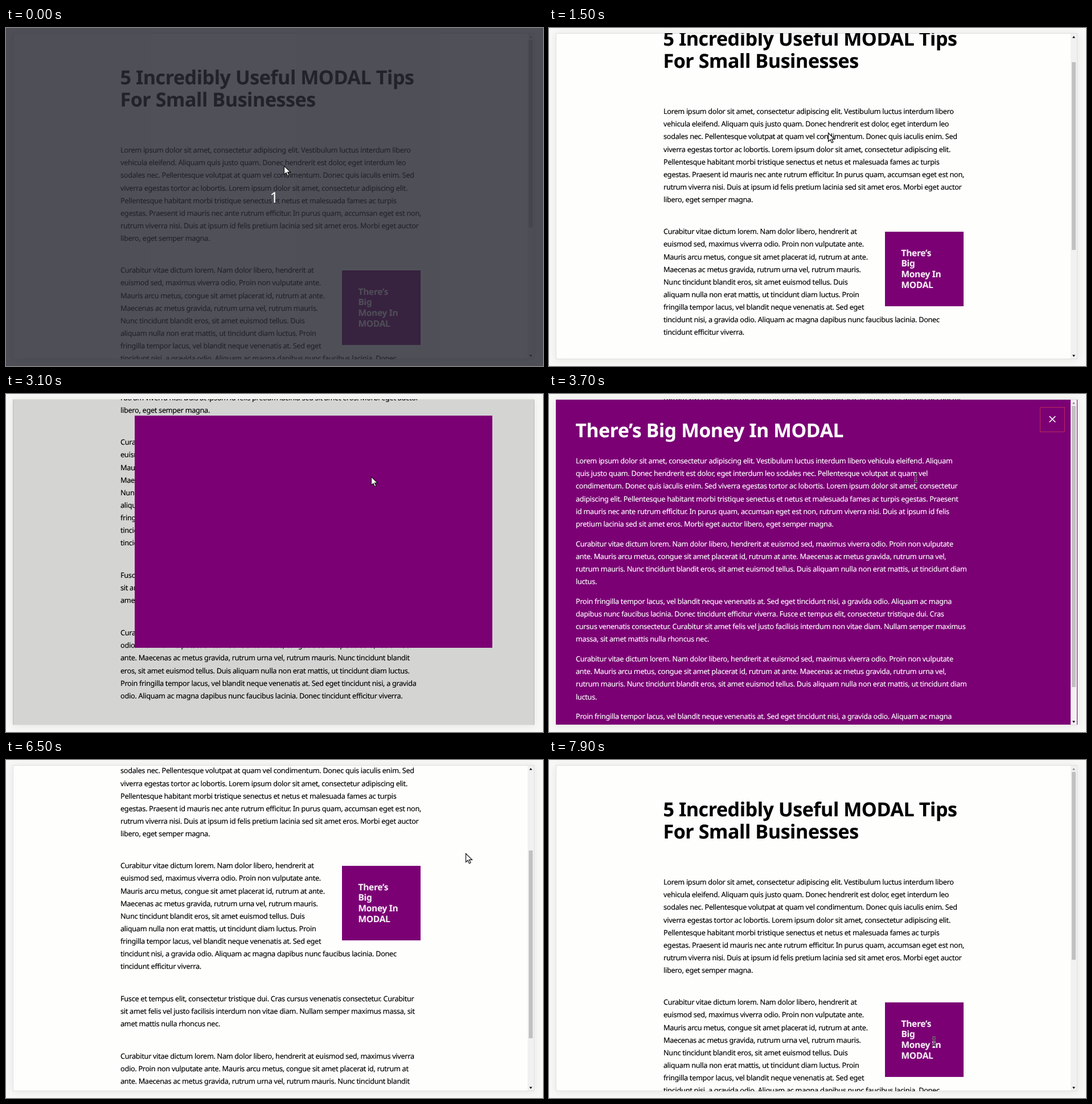
Write an HTML page that moves like this. It is 943 px wide and 594 px high and loops after 8000 ms.

```html
<!DOCTYPE html>
<html lang="en">
<head>
<meta charset="utf-8">
<style>
html, body { margin: 0; width: 100%; height: 100%; overflow: hidden; }
body { position: relative; background: #f8f8f6; font-family: "Noto Sans", "Open Sans", sans-serif; text-rendering: geometricPrecision; }
div, svg { position: absolute; }
#frame, #shade { left: 12px; top: 9px; width: 916px; height: 573px; }
#frame { background: #fefefd; box-shadow: inset 0 0 0 1px #e0e0de; overflow: hidden; }
#shade { box-shadow: 0 1px 14px rgba(0,0,0,.08); }
/* children of these layers use stage coordinates */
.stage { left: -12px; top: -9px; width: 943px; height: 594px; }
.text { white-space: pre; font-size: 12.7px; line-height: 22.13px; letter-spacing: -.29px; -webkit-text-stroke: .15px; }
.title { font-weight: 700; font-size: 34px; line-height: 39px; letter-spacing: -.44px; }
.modalTitle { font-size: 33.5px; letter-spacing: -.32px; }
.cardTitle { font-weight: 700; font-size: 15.5px; line-height: 18.7px; letter-spacing: -.3px; color: #f6ebf5; }
#card, #modal { background: #7b0074; }
#card { left: 590px; top: 426px; width: 138px; height: 131px; }
#backdrop { inset: 1px 0; background: #000; }
#content { color: #fff; }
#close { left: 862px; top: 23px; width: 42px; height: 42px; border: 1px solid #b92a58; }
#bar { left: 916px; top: 10px; width: 11px; height: 571px; background: #f1f1f1; }
#thumb { left: 2px; width: 7px; background: #c1c1c1; }
#dim { inset: 0; background: rgba(41,42,52,.82); }
#count { left: 0; width: 942px; top: 277px; line-height: 40px; font-size: 26px; text-align: center; color: #fff; }
svg { overflow: visible; }
#pointer { left: 0; top: 0; }
</style>
</head>
<body>
<div id="shade"></div>
<div id="frame">
  <div class="stage" id="article"><div id="card"></div></div>
  <div id="backdrop"></div>
  <div class="stage" id="overlay">
    <div id="modal"></div>
    <div id="content">
      <div id="close"><svg width="42" height="42"><path d="M15.750 15l10.500 10.500m0-10.500l-10.500 10.500" stroke="#fff" stroke-width="1.700"/></svg></div>
    </div>
  </div>
  <div class="stage"><div id="bar">
    <div id="thumb"></div>
    <svg width="11" height="571"><path id="up" d="M3 7.500l2.500-3.500 2.500 3.500z"/><path d="M3 564.500l2.500 3.500 2.500-3.500z"/></svg>
  </div></div>
</div>
<div id="dim"><div id="count">1</div></div>
<svg id="pointer" width="1" height="1">
  <path id="arrow" d="M.500 .500V15.500L4 12.300L6.500 17.700L9 16.500L6.500 11.300H11.500Z" fill="#fff" stroke="#111" stroke-width="1.200"/>
  <g id="beam" fill="none">
    <path d="M-3-7H-1L0-6L1-7H3M0-6V6M-3 7H-1L0 6L1 7H3" stroke="#fff" stroke-opacity=".8" stroke-width="3"/>
    <path d="M-3-7H-1L0-6L1-7H3M0-6V6M-3 7H-1L0 6L1 7H3" stroke="#111" stroke-width="1.600"/>
  </g>
</svg>
<script>
const $ = id => document.getElementById(id);

// y is the middle of the first line
function write(parent, x, y, lineHeight, text, style = '') {
  const el = document.createElement('div');
  el.className = 'text ' + style;
  el.style.left = x + 'px';
  el.style.top = y - lineHeight / 2 + 'px';
  el.textContent = text;
  $(parent).append(el);
}
const body = (parent, x, y, text) => write(parent, x, y, 22.13, text);

write('article', 200.5, 86.8, 39, '5 Incredibly Useful MODAL Tips\nFor Small Businesses', 'title');
write('article', 618.5, 463, 18.7, 'There’s\nBig\nMoney In\nMODAL', 'cardTitle');
body('article', 201, 214.2, `Lorem ipsum dolor sit amet, consectetur adipiscing elit. Vestibulum luctus interdum libero
vehicula eleifend. Aliquam quis justo quam. Donec hendrerit est dolor, eget interdum leo
sodales nec. Pellentesque volutpat at quam vel condimentum. Donec quis iaculis enim. Sed
viverra egestas tortor ac lobortis. Lorem ipsum dolor sit amet, consectetur adipiscing elit.
Pellentesque habitant morbi tristique senectus et netus et malesuada fames ac turpis
egestas. Praesent id mauris nec ante rutrum efficitur. In purus quam, accumsan eget est non,
rutrum viverra nisi. Duis at ipsum id felis pretium lacinia sed sit amet eros. Morbi eget auctor
libero, eget semper magna.`);
body('article', 201, 425.4, `Curabitur vitae dictum lorem. Nam dolor libero, hendrerit at
euismod sed, maximus viverra odio. Proin non vulputate ante.
Mauris arcu metus, congue sit amet placerat id, rutrum at ante.
Maecenas ac metus gravida, rutrum urna vel, rutrum mauris.
Nunc tincidunt blandit eros, sit amet euismod tellus. Duis
aliquam nulla non erat mattis, ut tincidunt diam luctus. Proin
fringilla tempor lacus, vel blandit neque venenatis at. Sed eget
tincidunt nisi, a gravida odio. Aliquam ac magna dapibus nunc faucibus lacinia. Donec
tincidunt efficitur viverra.`);
body('article', 201, 659.2, `Fusce et tempus elit, consectetur tristique dui. Cras cursus venenatis consectetur. Curabitur
sit amet felis vel justo facilisis interdum non vitae diam. Nullam semper maximus massa, sit
amet mattis nulla rhoncus nec.`);
body('article', 201, 760.2, `Curabitur vitae dictum lorem. Nam dolor libero, hendrerit at euismod sed, maximus viverra
odio. Proin non vulputate ante. Mauris arcu metus, congue sit amet placerat id, rutrum at
ante. Maecenas ac metus gravida, rutrum urna vel, rutrum mauris. Nunc tincidunt blandit
eros, sit amet euismod tellus. Duis aliquam nulla non erat mattis, ut tincidunt diam luctus.
Proin fringilla tempor lacus, vel blandit neque venenatis at. Sed eget tincidunt nisi, a gravida
odio. Aliquam ac magna dapibus nunc faucibus lacinia. Donec tincidunt efficitur viverra.`);

const curabitur = `Curabitur vitae dictum lorem. Nam dolor libero, hendrerit at euismod sed, maximus viverra odio. Proin non vulputate
ante. Mauris arcu metus, congue sit amet placerat id, rutrum at ante. Maecenas ac metus gravida, rutrum urna vel,
rutrum mauris. Nunc tincidunt blandit eros, sit amet euismod tellus. Duis aliquam nulla non erat mattis, ut tincidunt diam
luctus.`;
const proin = `Proin fringilla tempor lacus, vel blandit neque venenatis at. Sed eget tincidunt nisi, a gravida odio. Aliquam ac magna
dapibus nunc faucibus lacinia. Donec tincidunt efficitur viverra. Fusce et tempus elit, consectetur tristique dui. Cras
cursus venenatis consectetur. Curabitur sit amet felis vel justo facilisis interdum non vitae diam. Nullam semper maximus
massa, sit amet mattis nulla rhoncus nec.`;
write('content', 46.5, 63.6, 39, 'There’s Big Money In MODAL', 'title modalTitle');
body('content', 47, 117.2, `Lorem ipsum dolor sit amet, consectetur adipiscing elit. Vestibulum luctus interdum libero vehicula eleifend. Aliquam
quis justo quam. Donec hendrerit est dolor, eget interdum leo sodales nec. Pellentesque volutpat at quam vel
condimentum. Donec quis iaculis enim. Sed viverra egestas tortor ac lobortis. Lorem ipsum dolor sit amet, consectetur
adipiscing elit. Pellentesque habitant morbi tristique senectus et netus et malesuada fames ac turpis egestas. Praesent
id mauris nec ante rutrum efficitur. In purus quam, accumsan eget est non, rutrum viverra nisi. Duis at ipsum id felis
pretium lacinia sed sit amet eros. Morbi eget auctor libero, eget semper magna.`);
[curabitur, proin, curabitur, proin].forEach((text, i) => body('content', 47, 263 + i * 101.1, text));

// Keys are [time, value, ...]; linear between them, held outside.
function track(keys, t) {
  const next = keys.findIndex(k => k[0] > t);
  if (next < 0) return keys[keys.length - 1].slice(1);
  if (!next) return keys[0].slice(1);
  const a = keys[next - 1], b = keys[next], f = (t - a[0]) / (b[0] - a[0]);
  return a.slice(1).map((v, i) => v + (b[i + 1] - v) * f);
}
const scrollKeys = [[1200, 0], [1300, 10], [1500, 68], [1600, 100], [1800, 100], [1900, 112],
  [2300, 325], [2400, 341], [6200, 341], [6300, 325], [6500, 240], [6600, 216], [6700, 208],
  [6800, 208], [7100, 100], [7300, 100], [7600, 0]];
const pointerKeys = [[400, 488, 242], [800, 490, 184], [1900, 490, 184], [2400, 598, 150], [2500, 598, 150],
  [2600, 630, 147], [2700, 641, 145], [3800, 641, 145], [4500, 884, 50], [4800, 884, 50], [4900, 882, 46],
  [5200, 882, 46], [5400, 846, 67], [6000, 807, 164], [6800, 807, 164], [7100, 760, 290], [7300, 760, 290],
  [7600, 676, 469], [7800, 676, 469], [7900, 673, 493]];
const growKeys = [[2800, 0], [2900, .1], [3100, .63], [3200, .85], [3300, .96], [3400, 1]];
const inkKeys = [[3300, 0], [3700, 1]];
const closeKeys = [[5000, 1], [5100, .5], [5200, .12], [5300, .12], [5400, 0]];
const cardBox = [590, 84.5, 728, 216], fullBox = [12, 10, 928, 581];

function draw(now) {
  const t = Math.floor(now % 8000 / 100) * 100; // ten poses a second
  const scroll = Math.round(track(scrollKeys, t)[0]);
  const grow = track(growKeys, t)[0];
  const fade = grow ? track(closeKeys, t)[0] : 0;
  const [left, top, right, bottom] = cardBox.map((v, i) => v + (fullBox[i] - v) * grow);

  $('article').style.transform = `translateY(${-scroll}px)`;
  $('backdrop').style.opacity = .26 * grow * fade;
  $('overlay').style.opacity = fade;
  Object.assign($('modal').style, {
    left: left + 'px', top: top + 'px', width: right - left + 'px', height: bottom - top + 'px'
  });
  $('content').style.opacity = track(inkKeys, t)[0];

  const inModal = t >= 3400 && t < 5100;
  $('bar').style.display = t >= 2900 && t < 3400 ? 'none' : '';
  $('thumb').style.top = (inModal ? 10.5 : 10.5 + scroll * .577) + 'px';
  $('thumb').style.height = (inModal ? 494 : 330.5) + 'px';
  $('up').style.fill = inModal || !scroll ? '#888' : '#000';

  const beam = t === 2700 || t === 2800 || t >= 3400 && t < 3900 || t >= 7900;
  const [x, y] = track(pointerKeys, t);
  const nudge = beam ? [3, 2] : [0, 0];
  $('pointer').style.transform = `translate(${x + nudge[0]}px, ${y + nudge[1]}px)`;
  $('arrow').style.display = beam ? 'none' : '';
  $('beam').style.display = beam ? '' : 'none';
  $('dim').style.display = t < 100 ? '' : 'none';
}
const start = performance.now();
function tick() {
  draw(performance.now() - start);
  requestAnimationFrame(tick);
}
tick();
</script>
</body>
</html>
```
